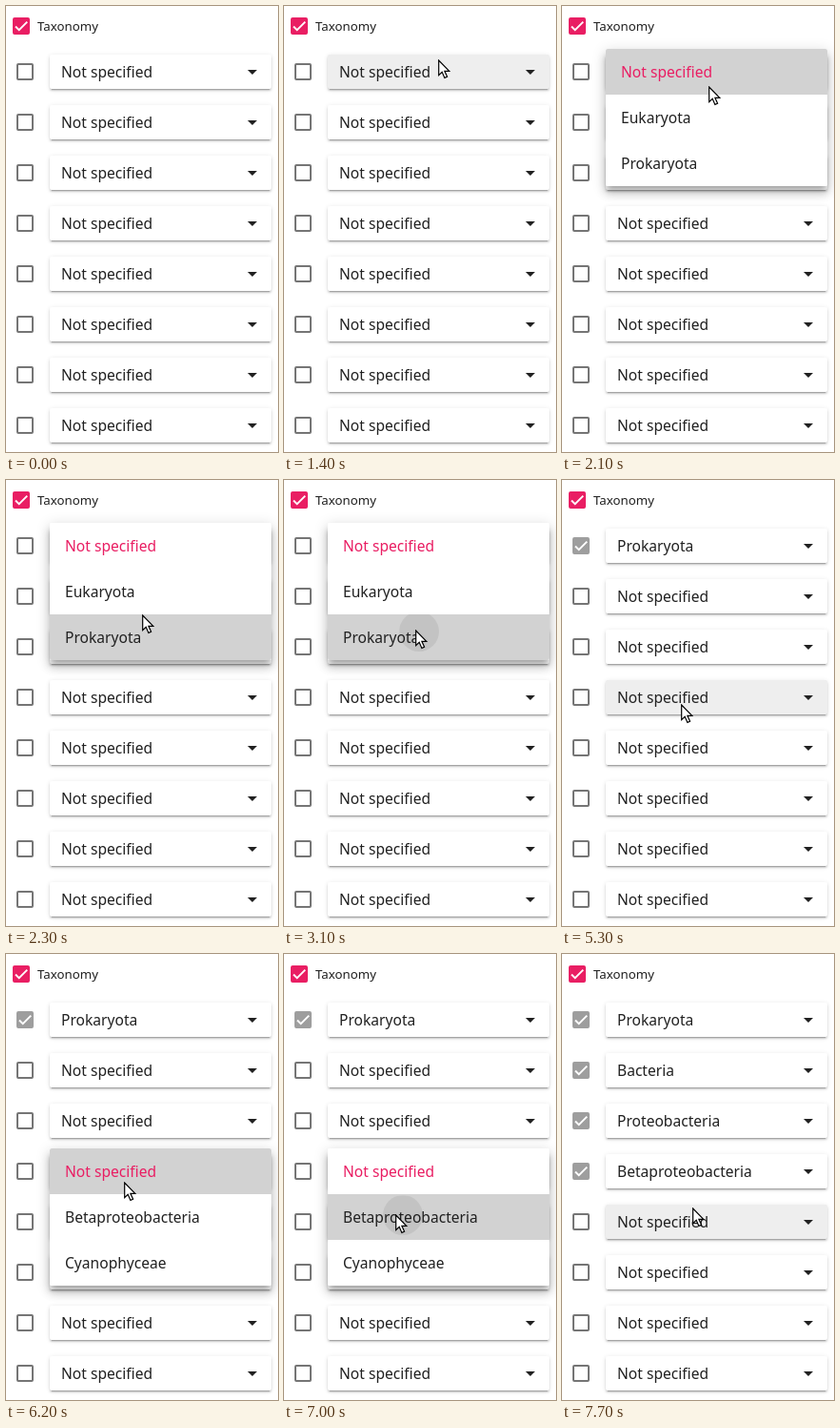
Recreate the animation shown at these times as an HTML page. Size 286x468 px, loop 8 s.

```html
<!DOCTYPE html>
<html lang="en">
<head>
<meta charset="utf-8">
<title>Taxonomy form</title>
<style>
html, body { margin: 0; width: 100%; height: 100%; overflow: hidden; background: #fff; }
body { position: relative; font: 15.6px "Noto Sans", "Open Sans", sans-serif; color: #212121; white-space: nowrap; }
div, svg { position: absolute; box-sizing: border-box; }
.title { left: 33px; top: 11px; font-size: 13.3px; line-height: 20px; }
.box { left: 11px; width: 18px; height: 18px; border: 2px solid #757575; border-radius: 2px; }
.box svg { left: 0; top: 0; width: 14px; height: 14px; fill: none; stroke: #fff; stroke-width: 3.2; visibility: hidden; }
.box.on { background: #9e9e9e; border-color: #9e9e9e; }
.box.main { left: 7px; top: 12px; background: #e91e63; border-color: #e91e63; }
.on svg { visibility: visible; }
.row { left: 46px; width: 233px; height: 36px; padding-left: 12px; line-height: 36px; border-radius: 2px; background: #fff;
  box-shadow: 0 3px 1px -2px rgba(0,0,0,.2), 0 2px 2px rgba(0,0,0,.14), 0 1px 5px rgba(0,0,0,.12); }
.row.hover { background: #eee; }
.row svg { left: 208px; top: 16px; width: 10px; height: 5px; }
.menu { left: 46px; width: 233px; height: 144px; border-radius: 2px; background: #fff; overflow: hidden; }
.panel { left: 46px; width: 233px; height: 144px; border-radius: 2px;
  box-shadow: 0 5px 5px -3px rgba(0,0,0,.2), 0 8px 10px 1px rgba(0,0,0,.14), 0 3px 14px 2px rgba(0,0,0,.12); }
.panel .menu { left: 0; top: 0; }
.item { left: 0; width: 233px; height: 48px; padding-left: 16px; line-height: 48px; overflow: hidden; }
.item:first-child { color: #e91e63; }
.item.hover { background: #d2d2d2; }
.ripple { border-radius: 50%; background: rgba(0,0,0,.07); }
#cursor { left: 0; top: 0; width: 14px; height: 21px; }
</style>
</head>
<body>
<script>
const LOOP = 8000, STEP = 100, ROWS = 8, NONE = "Not specified";
const check = '<svg viewBox="0 0 24 24"><path d="M1.7 12.9 8.1 19.3 22.8 4.6"/></svg>';
const arrow = '<svg viewBox="0 0 10 5"><path d="M0 0h10L5 5z" fill="#212121"/></svg>';

// Pointer tip: time, x, y
const path = [
  [600, 192, -24], [1400, 162, 57], [2000, 162, 57], [2100, 154, 85], [2300, 143, 142],
  [2400, 140, 154], [2500, 140, 154], [2600, 138, 158], [4400, 138, 158], [4500, 136, 163],
  [5300, 125, 236], [5900, 125, 236], [6200, 124, 240], [6600, 117, 274], [7400, 117, 274], [7700, 137, 267]
];

function add(parent, cls, html = "", top) {
  const el = document.createElement("div");
  el.className = cls;
  el.innerHTML = html;
  if (top !== undefined) el.style.top = top + "px";
  parent.append(el);
  return el;
}

add(document.body, "box main on", check);
add(document.body, "title", "Taxonomy");
const rows = Array.from({ length: ROWS }, (_, i) => {
  const top = 51 + 53 * i;
  const box = add(document.body, "box", check, top + 9);
  const el = add(document.body, "row", "<span></span>" + arrow, top);
  return { top, box, el, label: el.firstChild };
});

function makeMenu(top, open, click, options, picks) {
  const panel = add(document.body, "panel", "", top);
  const list = add(panel, "menu");
  const items = options.map((text, i) => add(list, "item", text, 48 * i));
  const ripple = add(list, "ripple");
  return { top, open, click, panel, items, ripple, picks };
}

const menus = [
  makeMenu(45, 1600, 3100, [NONE, "Eukaryota", "Prokaryota"], ["Prokaryota"]),
  makeMenu(204, 5400, 7000, [NONE, "Betaproteobacteria", "Cyanophyceae"],
    ["Prokaryota", "Bacteria", "Proteobacteria", "Betaproteobacteria"])
];

document.body.insertAdjacentHTML("beforeend",
  '<svg id="cursor" viewBox="0 0 14 21"><path d="M.7 1v15.6l3.5-3.3 2.7 6.1 2.7-1.2-2.7-5.9h4.9z" fill="#fff" stroke="#000" stroke-width="1.2"/></svg>');
const cursor = document.getElementById("cursor");

const clamp = v => Math.max(0, Math.min(1, v));
const mix = (a, b, k) => a + (b - a) * k;

function pointer(t) {
  const n = path.findIndex(p => p[0] > t);
  if (n === 0) return [0, -40];
  if (n < 0) return path[path.length - 1].slice(1);
  const a = path[n - 1], b = path[n], k = (t - a[0]) / (b[0] - a[0]);
  return [mix(a[1], b[1], k), mix(a[2], b[2], k)];
}

function drawMenu(m, t, x, y) {
  const alpha = Math.min(clamp((t - m.open + 100) / 200), clamp((m.click + 300 - t) / 200));
  m.panel.style.opacity = alpha;
  const active = Math.max(0, Math.min(2, Math.floor((y - m.top) / 48)));
  m.items.forEach((el, i) => el.classList.toggle("hover", i === active));

  // The ripple grows from the pointer and drifts to the item's centre
  const k = clamp((t - m.click + 40) / 225), r = t < m.click ? 0 : mix(0, 118, k);
  const cx = mix(x - 46, 116, k), cy = mix(y - m.top, 48 * active + 24, k);
  Object.assign(m.ripple.style, {
    left: cx - r + "px", top: cy - r + "px", width: 2 * r + "px", height: 2 * r + "px",
    clipPath: `inset(${Math.max(0, 48 * active - cy + r)}px 0 ${Math.max(0, cy + r - 48 * active - 48)}px 0)`
  });
  return alpha > 0;
}

function draw(now) {
  const t = Math.floor(now % LOOP / STEP) * STEP;
  const [x, y] = pointer(t);
  let open = false, picks = [];
  for (const m of menus) {
    open = drawMenu(m, t, x, y) || open;
    if (t >= m.click + 200) picks = m.picks;
  }
  rows.forEach((r, i) => {
    r.label.textContent = picks[i] || NONE;
    r.box.classList.toggle("on", i < picks.length);
    r.el.classList.toggle("hover", !open && y >= r.top && y < r.top + 36);
  });
  cursor.style.transform = `translate(${Math.round(x)}px, ${Math.round(y) - 1}px)`;
}

const start = performance.now();
function tick() {
  draw(performance.now() - start);
  requestAnimationFrame(tick);
}
tick();
</script>
</body>
</html>
```
